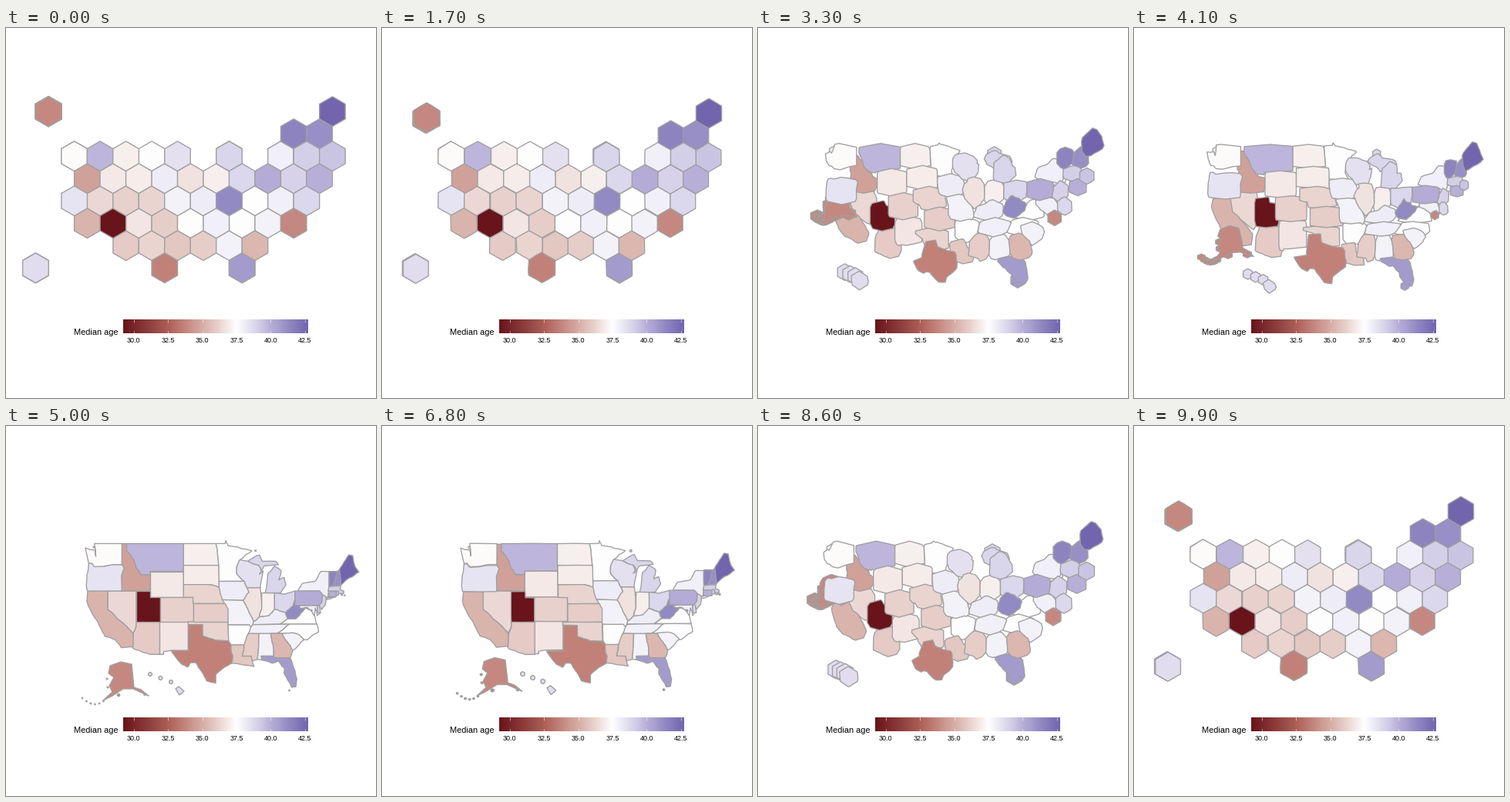
These frames come from a looping animation (480 by 480 pixels, 10 s). A matplotlib script:

```python
import random
import numpy as np
import matplotlib.pyplot as plt
from matplotlib.animation import FuncAnimation
from matplotlib.collections import PolyCollection
from matplotlib.colors import LinearSegmentedColormap

SIZE, FRAMES, STEP = 480, 100, 100
LOW, HIGH = 29.2, 42.7
PX = 0.72  # points per pixel at 100 dpi

stops = [(29.2, "#68141a"), (32.5, "#ac6058"), (33.7, "#c3857d"), (35.0, "#d6aea6"),
         (36.0, "#e6cdc8"), (37.45, "#ffffff"), (39.1, "#d4cfe8"), (40.0, "#b7afd8"),
         (41.3, "#928ac2"), (42.7, "#7265ae")]
cmap = LinearSegmentedColormap.from_list(
    "age", [((a - LOW) / (HIGH - LOW), c) for a, c in stops], N=512)

# Hex grid: first column of each row, then its tiles
GRID = [(.5, "AK - - - - - - - - - - ME"),
        (10, "VT NH"),
        (1.5, "WA MT ND MN WI - MI - NY MA RI"),
        (2, "ID WY SD IA IL IN OH PA NJ CT"),
        (1.5, "OR NV CO NE MO KY WV VA MD DE"),
        (2, "CA UT NM KS AR TN NC SC DC"),
        (3.5, "AZ OK LA MS AL GA"),
        (0, "HI - - - - TX - - FL")]
cells = {code: (38.4 + 33.48 * (first + k), 108.3 + 29 * row)
         for row, (first, line) in enumerate(GRID)
         for k, code in enumerate(line.split())}

starts, ends, fills = [], [], []


def mercator(lat):
    return np.log(np.tan(np.pi / 4 + np.radians(lat) / 2))


SCALE, TOP = 352.4, mercator(49)


def project(p):
    """West longitude and latitude to pixels."""
    lon, lat = np.asarray(p).T
    return np.column_stack([103 + 6.15 * (124.7 - lon),
                            152.5 + SCALE * (TOP - mercator(lat))])


def unproject(p):
    x, y = np.asarray(p).T
    m = TOP - (y - 152.5) / SCALE
    return np.column_stack([124.7 - (x - 103) / 6.15,
                            np.degrees(2 * np.arctan(np.exp(m))) - 90])


def rough(p, q, rng, depth=3):
    """Points from p up to q, broken by midpoint displacement."""
    d = q - p
    size = np.hypot(*d)
    if not depth or min(abs(d)) < .25:
        return [p]
    shift = rng.uniform(-1, 1) * min(.07 * size, .12)
    mid = (p + q) / 2 + shift * np.array([-d[1], d[0]]) / size
    return rough(p, mid, rng, depth - 1) + rough(mid, q, rng, depth - 1)


def border(p, q):
    """Slanted edges become ragged, alike for both neighbours."""
    a, b = sorted([tuple(p), tuple(q)])
    line = rough(np.array(a), np.array(b), random.Random(f"{a}{b}")) + [np.array(b)]
    return line[:-1] if a == tuple(p) else line[:0:-1]


def land(*flat):
    pts = np.reshape(flat, (-1, 2)).astype(float)
    return project([v for p, q in zip(pts, np.roll(pts, -1, axis=0)) for v in border(p, q)])


def box(west, east, south, north):
    return land(west, north, east, north, east, south, west, south)


def hexagon(x, y, r=19.35):
    a = np.radians(np.arange(-90, 270, 60))
    return np.column_stack([x + r * np.cos(a), y + r * np.sin(a)])


def islet(lon, lat, r=1.0):
    return hexagon(*project([(lon, lat)])[0], r)


def clockwise(p):
    x, y = p.T
    area = np.sum(x * np.roll(y, -1) - y * np.roll(x, -1))
    return p if area > 0 else p[::-1]


def arc(p):
    """Arc-length position of each vertex, 0 to 1."""
    d = np.hypot(*(np.roll(p, -1, axis=0) - p).T)
    return np.concatenate([[0], np.cumsum(d)[:-1]]) / d.sum()


def along(p, t):
    s = arc(p)
    return np.column_stack([np.interp(t, s, p[:, k], period=1) for k in (0, 1)])


def match(a, b):
    """Resample two outlines to the same, best aligned points."""
    a, b = clockwise(a), clockwise(b)
    t = np.arange(60) / 60
    pa, pb = along(a, t), along(b, t)
    pa, pb = pa - pa.mean(0), pb - pb.mean(0)
    cost = [np.sum((np.roll(pa, -k, axis=0) - pb) ** 2) for k in range(60)]
    shift = np.argmin(cost) / 60
    t = np.unique(np.concatenate([t, arc(b), (arc(a) - shift) % 1]))
    return along(a, (t + shift) % 1), along(b, t)


def add(code, age, *parts):
    for part in parts:
        a, b = match(hexagon(*cells[code]), part)
        starts.append(unproject(a))
        ends.append(unproject(b))
        fills.append(cmap((age - LOW) / (HIGH - LOW)))


# West
add("NV", 36.3, land(120, 42, 114, 42, 114, 36.2, 114.6, 35, 120, 39))
add("AZ", 35.9, land(114, 37, 109, 37, 109, 31.3, 111.1, 31.3, 114.8, 32.5, 114.6, 35,
                     114, 36.2))
add("CA", 35.2, land(124.2, 42, 120, 42, 120, 39, 114.6, 35, 114.6, 32.7, 117.1, 32.5,
                     118.4, 33.9, 120.6, 34.5, 121.9, 36.6, 123.8, 39.2, 124.4, 40.4))
aleutians = [hexagon(99 + 5.5 * k, 353 + 8 * np.sin(np.pi * k / 6), .8) for k in range(6)]
add("AK", 33.8, *aleutians, hexagon(131, 328, 1), hexagon(132, 339, 1),
    hexagon(146, 349, 1.8), hexagon(180, 348, 1.5),
    np.array([(135, 311), (149, 306), (163, 309), (166, 339), (175, 342), (185, 350),
              (165, 341), (152, 341), (138, 350), (126, 356), (138, 345), (134, 337),
              (140, 326), (133, 321)]))
add("ID", 34.6, land(117, 49, 116, 49, 116, 48, 114.4, 46.6, 114, 45.6, 113, 44.5,
                     111, 44.5, 111, 42, 117, 42, 117.1, 44.3, 116.5, 45.5, 117, 46))
add("OR", 38.4, land(124, 46.2, 123.3, 46.2, 122.8, 45.7, 119, 46, 117, 46, 116.5, 45.5,
                     117.1, 44.3, 117, 42, 124.3, 42, 124.5, 42.8))
add("WA", 37.3, islet(122.9, 48.5),
    land(124.7, 48.4, 122.7, 48.1, 122.5, 47.2, 122.8, 49, 117, 49, 117, 46, 119, 46,
         122.8, 45.7, 123.3, 46.2, 124, 46.2))
add("MT", 39.8, land(116, 49, 104, 49, 104, 45, 111, 45, 111, 44.5, 113, 44.5, 114, 45.6,
                     114.4, 46.6, 116, 48))
add("WY", 36.8, box(111, 104, 41, 45))
add("NM", 36.7, land(109, 37, 103, 37, 103, 32, 106.6, 32, 108.2, 31.8, 108.2, 31.3,
                     109, 31.3))
add("UT", 29.2, land(114, 42, 111, 42, 111, 41, 109, 41, 109, 37, 114, 37))
add("CO", 36.1, box(109, 102, 37, 41))

# Plains
add("MN", 37.4, land(97.2, 49, 95.2, 49, 95.1, 49.4, 94.6, 48.7, 92.5, 48.5, 89.6, 48,
                     92.1, 46.7, 92.8, 45.6, 92.8, 44.7, 91.2, 43.5, 96.5, 43.5,
                     96.6, 45.9))
add("ND", 37.0, land(104, 49, 97.2, 49, 96.6, 45.9, 104, 45.9))
add("SD", 36.9, land(104, 45.9, 96.6, 45.9, 96.5, 42.5, 98.3, 43, 104, 43))
add("NE", 36.2, land(104, 43, 98.3, 43, 96.5, 42.5, 95.3, 40, 102, 40, 102, 41, 104, 41))
add("OK", 36.2, land(103, 37, 94.6, 37, 94.5, 33.7, 97.2, 33.8, 100, 34.6, 100, 36.5,
                     103, 36.5))
add("KS", 36.0, box(102, 94.6, 37, 40))
add("IA", 38.1, land(96.5, 43.5, 91.2, 43.5, 90.2, 41.8, 91.4, 40.5, 95.8, 40.6, 96.5, 42.5))
add("AR", 37.4, land(94.6, 36.5, 90.2, 36.5, 89.7, 36, 91.2, 33, 94, 33, 94.5, 33.7))
add("MO", 37.9, land(95.8, 40.6, 91.4, 40.5, 90.2, 38.6, 89.2, 37, 89.7, 36, 90.2, 36.5,
                     94.6, 36.5, 94.6, 39.1))

# Great Lakes
add("WI", 38.5, land(92.1, 46.7, 90.4, 46.5, 88.1, 45.9, 87.6, 45.1, 88, 44.6, 87.2, 45.1,
                     87.8, 42.5, 90.6, 42.5, 91.2, 43.5, 92.8, 44.7, 92.8, 45.6))
add("IL", 36.6, land(90.6, 42.5, 87.8, 42.5, 87.5, 39.2, 88, 37.8, 89.2, 37, 90.2, 38.6,
                     91.4, 40.5, 90.2, 41.8))
add("IN", 37.0, land(87.5, 41.7, 84.8, 41.7, 84.8, 39.1, 86, 38, 88, 37.8, 87.5, 39.2))
add("MI", 38.9, islet(88.8, 48),
    land(90.4, 46.5, 88, 47.4, 87.4, 46.5, 84.6, 46.5, 84, 46, 87, 45.8, 87.6, 45.1,
         88.1, 45.9),
    land(86.8, 41.7, 83.5, 41.7, 82.4, 43, 82.8, 44.1, 83.9, 43.7, 83.4, 45.1, 84.8, 45.8,
         86.2, 44.7, 86.4, 43.2))
add("OH", 38.8, land(84.8, 41.7, 82.7, 41.5, 80.5, 42, 80.5, 40.6, 80.9, 39.6, 82.5, 38.5,
                     84.8, 39.1))

# Northeast
add("NY", 38.0, land(74, 40.6, 73.7, 40.9, 71.9, 41.1),
    land(79.8, 42.2, 78.9, 43.2, 76.3, 43.5, 75, 45, 73.3, 45, 73.3, 42.7, 73.5, 41.1,
         73.9, 41, 74.7, 41.4, 75.3, 42, 79.8, 42))
add("NH", 41.1, land(71.5, 45, 71.1, 45.3, 70.8, 42.9, 72.5, 42.7))
add("VT", 41.5, land(73.3, 45, 71.5, 45, 72.5, 42.7, 73.3, 42.7))
add("ME", 42.7, land(71.1, 45.3, 70.2, 46.3, 69.2, 47.4, 68.3, 47.3, 67.8, 45.7, 67, 44.9,
                     69.1, 44, 70.8, 42.9))
add("VA", 37.5, land(83.7, 36.6, 82, 37.5, 80.3, 37.5, 78.3, 39.4, 77.1, 38.9, 76.3, 37.9,
                     75.9, 36.6))
add("MD", 38.0, land(79.5, 39.7, 75.8, 39.7, 75.7, 38.5, 75.1, 38.5, 75.8, 38, 76.2, 39.3,
                     76.4, 38, 77.1, 38.9, 77.8, 39.3, 79.5, 39.2))
add("PA", 40.1, land(80.5, 42, 75.3, 42, 74.7, 41.4, 74.8, 40.2, 75.4, 39.7, 80.5, 39.7))
add("NJ", 39.0, land(74.7, 41.4, 73.9, 41, 74.1, 39.8, 74.9, 39, 75.4, 39.7, 74.8, 40.2))
add("MA", 39.1, islet(70.6, 41.4), islet(70, 41.3, .7),
    land(73.3, 42.7, 70.8, 42.8, 71, 42.2, 70.2, 42, 70.2, 41.6, 71.3, 41.6, 71.4, 42,
         73.5, 42))
add("CT", 40.0, box(73.5, 71.8, 41.2, 42))
add("RI", 39.4, box(71.8, 71.3, 41.4, 42))
add("DE", 38.8, land(75.8, 39.7, 75.4, 39.7, 75.1, 38.5, 75.7, 38.5))

# South
add("KY", 38.1, land(89.4, 36.5, 89.2, 37, 88, 37.8, 86, 38, 84.8, 39.1, 82.5, 38.5,
                     82, 37.5, 83.7, 36.6))
add("WV", 41.3, land(80.5, 40.6, 80.5, 39.7, 79.5, 39.7, 79.5, 39.2, 77.8, 39.3, 78.3, 39.4,
                     80.3, 37.5, 82, 37.5, 82.5, 38.5, 80.9, 39.6))
add("LA", 35.8, land(94, 33, 91.2, 33, 91.6, 31, 89.7, 31, 89.5, 30.1, 89.1, 29.1,
                     91.5, 29.4, 93.8, 29.7, 93.6, 31, 94, 32))
add("MS", 36.0, land(91.2, 33, 90.3, 35, 88.1, 35, 88.4, 30.4, 89.5, 30.1, 89.7, 31,
                     91.6, 31))
add("AL", 37.9, land(88.1, 35, 85.6, 35, 85, 32.3, 85, 31, 87.6, 31, 87.5, 30.3, 88.4, 30.4))
add("NC", 37.4, land(84.3, 35, 81.7, 36.6, 75.9, 36.6, 75.5, 35.3, 77.9, 33.9, 78.6, 33.9,
                     79.7, 34.8, 81, 35.1, 83.2, 35))
add("TN", 38.0, land(90.3, 35, 89.4, 36.5, 81.7, 36.6, 84.3, 35))
add("SC", 37.9, land(83.2, 35, 81, 35.1, 79.7, 34.8, 78.6, 33.9, 81, 32))
add("FL", 40.7, islet(81.7, 24.6, .8),
    land(87.6, 31, 85, 31, 84.9, 30.7, 81.5, 30.7, 80.5, 28.4, 80.1, 26.8, 80.3, 25.3,
         81.2, 25.2, 82.8, 27.8, 82.7, 28.8, 84, 30.1, 85.3, 29.7, 87.5, 30.3))
add("GA", 35.3, land(85.6, 35, 83.2, 35, 81, 32, 81.5, 30.7, 84.9, 30.7, 85, 32.3))
add("TX", 33.6, land(103, 36.5, 100, 36.5, 100, 34.6, 97.2, 33.8, 94.5, 33.7, 94, 33, 94, 32,
                     93.6, 31, 93.8, 29.7, 95.1, 29.1, 97.2, 27.6, 97.2, 26, 99.1, 26.4,
                     100.3, 28.3, 101.4, 29.8, 102.5, 29.8, 103.1, 29, 104.5, 29.6,
                     106.6, 32, 103, 32))
add("HI", 38.6, *[hexagon(187 + 13.5 * k, 322 + 5 * k, 2.6) for k in range(3)],
    np.array([(220, 341), (224, 338), (231, 344), (225, 349)]))
add("DC", 33.8, islet(77, 38.9, .8))

fig = plt.figure(figsize=(4.8, 4.8), dpi=100, facecolor="white")
ax = fig.add_axes([0, 0, 1, 1])

shapes = PolyCollection([project(p) for p in starts], facecolors=fills,
                        edgecolors="#a0a0a0", linewidths=1.35 * PX, joinstyle="round")
ax.add_collection(shapes)

# Legend
X0, X1, Y0, Y1 = 151.5, 391.5, 378, 396
ax.imshow(np.linspace(0, 1, 300)[None], cmap=cmap, extent=(X0, X1, Y1, Y0), aspect="auto")
ax.text(88.3, 398, "Median age", family="Liberation Sans", size=11 * PX, va="baseline")
for value in np.arange(30, 43, 2.5):
    x = X0 + (value - LOW) / (HIGH - LOW) * (X1 - X0)
    for y, d in ((Y0, 3.5), (Y1, -3.5)):
        ax.plot([x, x], [y, y + d], color="white", lw=0.55 * PX, solid_capstyle="butt")
    ax.text(x, 408.3, f"{value:.1f}", family="Liberation Sans", size=9 * PX,
            ha="center", va="baseline")

ax.set(xlim=(0, SIZE), ylim=(SIZE, 0))
ax.axis("off")


def progress(i):
    """0 on the hex grid, 1 on the map, linear between."""
    return np.interp(i, [16, 50, 67, 100], [0, 1, 1, 0])


def draw(i):
    """Move in degrees, then project."""
    p = progress(i)
    shapes.set_verts([project(a + (b - a) * p) for a, b in zip(starts, ends)])
    return [shapes]


anim = FuncAnimation(fig, draw, frames=FRAMES, interval=STEP, repeat=True, repeat_delay=0)
plt.show()
```
